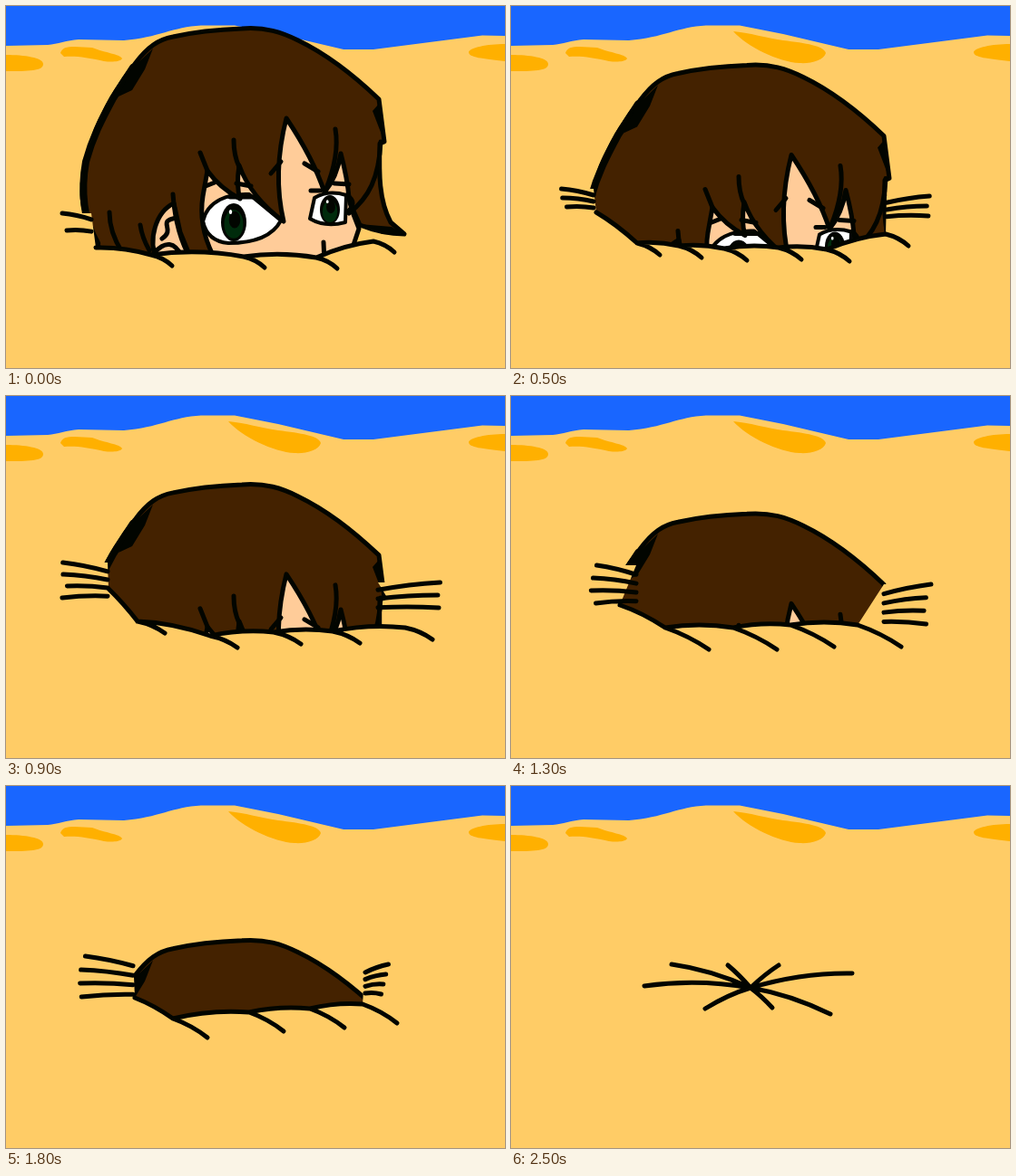
Write an HTML page with a canvas that moves like this. It is 550 px wide and 400 px high and loops after 3000 ms.

```html
<!DOCTYPE html>
<html lang="en">
<head>
<meta charset="utf-8">
<title>Sinking into the sand</title>
<style>
html, body { margin: 0; width: 100%; height: 100%; overflow: hidden; background: #ffcc66; }
canvas { display: block; }
</style>
</head>
<body>
<canvas id="stage" width="550" height="400"></canvas>
<script>
const ctx = document.getElementById('stage').getContext('2d');
const INK = '#020500', SAND = '#ffcc66', DUNE = '#ffb000', SKY = '#1966ff';
const HAIR = '#442200', SKIN = '#ffcc99', IRIS = '#002b0c';
const LOOP = 3000, STEP = 100, SINK = 8.1;

const points = s => s.split(' ').map(p => p.split(',').map(Number));
const lerp = (a, b, k) => a + (b - a) * k;
const noise = n => Math.sin(n * 12.9) * 43758 % 1;

function fill(d, color) {
  ctx.fillStyle = color;
  ctx.fill(d);
}

function ink(d, width = 5) {
  ctx.lineWidth = width;
  ctx.strokeStyle = INK;
  ctx.stroke(d);
}

// Adds a bowed edge from a to b; dx, dy push its middle aside
function bow(path, a, b, dx, dy) {
  path.quadraticCurveTo((a[0] + b[0]) / 2 + dx, (a[1] + b[1]) / 2 + dy, b[0], b[1]);
}

function hump(path, a, b) {
  bow(path, a, b, 0, -.08 * (b[0] - a[0]));
}

// Evenly spaced loose lines that spread from the rim to one side
function fan(path, [root, tip, top, bottom, count], seed) {
  for (let i = 0; i < count; i++) {
    const y = lerp(top, bottom, i / (count - 1));
    const a = [root, lerp(y, (top + bottom) / 2, .3) + 4];
    const b = [tip + 8 * noise(seed + i), y];
    path.moveTo(...a);
    bow(path, a, b, 0, -2);
  }
}

// The rim runs in humps from node to node; each hump leaves a tail behind
function pit(from, rim, [tx, ty], left, right) {
  const nodes = points(rim), lines = new Path2D(), cover = new Path2D();
  cover.moveTo(0, left[2]);
  cover.lineTo(left[0], left[2]);
  cover.lineTo(...nodes[0]);
  nodes.slice(1).forEach((b, i) => {
    const a = nodes[i];
    hump(cover, a, b);
    lines.moveTo(...a);
    hump(lines, a, b);
    bow(lines, b, [b[0] + tx, b[1] + ty], 2, -3);
  });
  cover.lineTo(right[0], right[2]);
  cover.lineTo(550, right[2]);
  cover.lineTo(550, 400);
  cover.lineTo(0, 400);
  fan(lines, left, from);
  fan(lines, right, from + 50);
  return { from, cover, lines };
}

function burst(from, center, tips) {
  const lines = new Path2D();
  points(tips).forEach(tip => {
    lines.moveTo(...center);
    bow(lines, center, tip, 0, -.08 * Math.abs(tip[0] - center[0]));
  });
  return { from, lines };
}

// Start step, rim nodes, tail, then each fan as root x, tip x, top, bottom, count
const poses = [
  pit(0, '99,267 160,275 262,277 342,278 405,260', [23, 12], [94, 62, 229, 248, 2], [428, 428, 266, 266, 0]),
  pit(3, '94,228 139,262 185,265 235,268 295,267 348,269 413,252', [25, 13], [91, 55, 202, 222, 3], [414, 463, 210, 232, 3]),
  pit(7, '113,213 145,249 225,265 295,261 360,260 440,256', [30, 13], [112, 62, 184, 223, 4], [410, 475, 206, 234, 3]),
  pit(11, '120,231 170,256 245,256 308,253 382,253', [48, 24], [138, 95, 187, 229, 4], [411, 455, 208, 252, 4]),
  pit(15, '142,234 184,257 268,250 335,246 393,241', [38, 21], [140, 88, 188, 233, 4], [396, 420, 197, 230, 4]),
  pit(19, '160,221 228,229 325,225 345,217', [43, 10], [166, 122, 191, 219, 4], [346, 382, 193, 214, 3]),
  burst(25, [264, 223], '147,221 177,197 239,198 295,198 376,207 352,252 288,245 214,246')
];

const scene = {
  sky: new Path2D('M0 0H550V33L525 32.500 405 48H372L300 31 252 21.500H215C184 23 168 35 130 38L80 37C67 38 57 42 46 43L0 44Z'),
  dunes: new Path2D('M0 54C20 54 41 57 41 64C41 72 25 72 0 72Z M60 52C62 46 66 45 76 45L95 46C110 52 125 53 128 58C126 62 115 62 108 61C90 57 78 55 64 56Z M550 42C530 42 511 46 510 51C510 57 525 58 550 61Z'),
  farDune: new Path2D('M245 28C260 29 285 36 300 38C325 41 345 44 347 52C345 60 330 64 318 63C295 62 260 45 245 28Z')
};

// Fringe: gaps and tips in turn, each edge with its own sideways bow
function fringe() {
  const edge = [[222, 182], [258, 213, -4], [257, 176, -4], [306, 238, -12], [309, 124, -14],
    [351, 206, 9], [369, 163, 5], [378, 212, 3]];
  const path = new Path2D('M228 300V275C218 255 213 235 217 210L222 182');
  edge.slice(1).forEach((b, i) => bow(path, edge[i], b, b[2], 4));
  path.addPath(new Path2D());
  path.bezierCurveTo(380, 225, 385, 235, 389, 246);
  path.lineTo(383, 264);
  path.lineTo(350, 300);
  path.closePath();
  return path;
}

const head = {
  hair: new Path2D('M180 300L118 290C94 260 83 222 84 205C84 180 92 152 104 126C116 100 128 82 142 64C156 45 168 37 184 34C206 29 232 26 260 25C286 23 304 29 322 38C355 54 385 78 411 103L417 150 412 152C411 185 411 215 424 239L439 252C420 252 405 248 390 242L378 215 360 300Z'),
  heavySide: new Path2D('M100 262C86 238 82 205 88 172C95 146 105 126 118 102L140 68'),
  blots: new Path2D('M124 100L138 70 162 47 153 70 139 93Z M404 116L411 108 417 150Z M390 241L425 244 439 253 415 252Z'),
  face: fringe(),
  ear: new Path2D('M167 282C155 258 166 227 185 218L192 250 205 282Z'),
  eyes: new Path2D('M217 238C222 215 245 207 268 208L303 237Q290 262 245 262Q222 260 217 238Z M335 235L340 212Q355 203 375 209L374 239Q352 245 335 235Z'),
  strands: new Path2D('M214 162L222 182M251 148Q251 165 257 178M363 136Q368 165 352 204M413 150C411 190 400 212 378 229M114 228Q114 250 128 272M148 242Q150 256 158 270M184 208C186 235 192 260 204 280'),
  marks: new Path2D('M188 234C165 238 188 246 172 257M163 273Q182 252 194 277M247 211H272M220 199L230 195M254 196L270 199M292 185L303 172M329 174L344 183M336 204H346M362 196L378 197M376 209Q388 217 376 228M350 261L351 284')
};

function pupil(x, y, rx, ry) {
  const oval = (dx, dy, k, color) => {
    const p = new Path2D();
    p.ellipse(x + dx, y + dy, rx * k, ry * k, 0, 0, Math.PI * 2);
    fill(p, color);
  };
  oval(0, 0, 1, INK);
  oval(0, 2, .75, IRIS);
  oval(1, -3, .45, INK);
  oval(-rx * .25, -ry * .55, .12, '#fff');
}

function drawHead() {
  fill(head.hair, HAIR);
  ink(head.hair);
  ink(head.heavySide, 8);
  fill(head.blots, INK);
  fill(head.ear, SKIN);
  ink(head.ear);
  fill(head.face, SKIN);
  ctx.save();
  ctx.clip(head.face);
  fill(head.eyes, '#fff');
  pupil(251, 239, 14, 21);
  pupil(357, 225, 11, 16);
  ink(head.eyes, 4);
  ctx.restore();
  ink(head.face);
  ink(head.strands);
  ink(head.marks);
}

function draw(step) {
  const now = poses.filter(p => p.from <= step).pop();
  ctx.fillStyle = SAND;
  ctx.fillRect(0, 0, 550, 400);
  fill(scene.sky, SKY);
  fill(scene.dunes, DUNE);
  if (step > 0) fill(scene.farDune, DUNE);
  if (now.cover) {
    ctx.save();
    ctx.translate(0, SINK * step);
    drawHead();
    ctx.restore();
    fill(now.cover, SAND);
  }
  ink(now.lines);
}

ctx.lineCap = ctx.lineJoin = 'round';
const start = performance.now();
function tick() {
  const t = (performance.now() - start) % LOOP;
  draw(Math.floor(t / STEP));
  requestAnimationFrame(tick);
}
tick();
</script>
</body>
</html>
```
